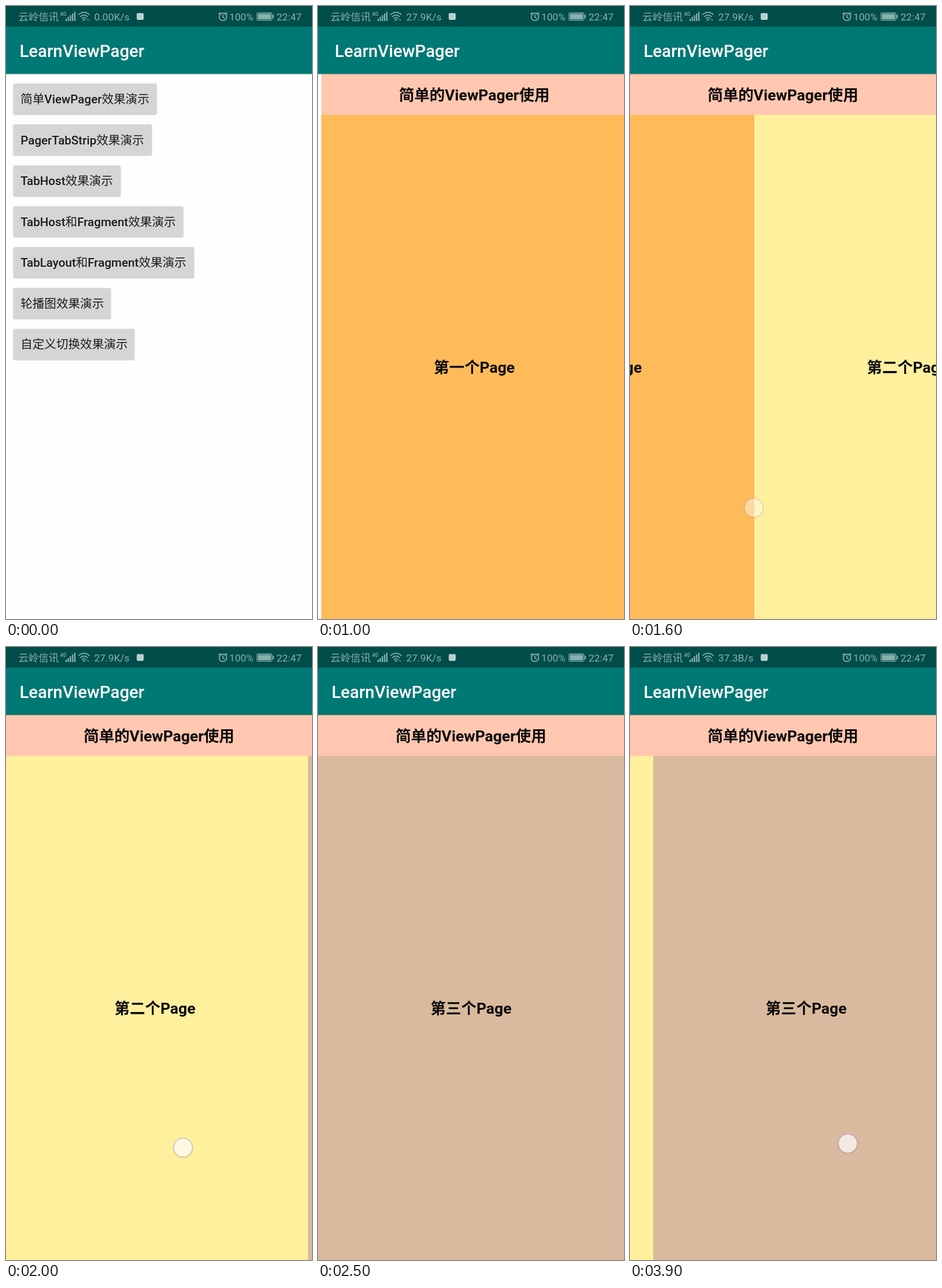
An HTML page for the animation above (4 s loop, 529x1058 px).

```html
<!DOCTYPE html>
<html lang="zh-CN">
<head>
<meta charset="utf-8">
<title>LearnViewPager</title>
<style>
html, body { margin: 0; width: 100%; height: 100%; overflow: hidden; background: #fefefe; }
svg { display: block; width: 100%; height: 100%; }
text { font-family: Roboto, "Noto Sans CJK SC", "Noto Sans CJK", sans-serif; white-space: pre; }
.status text { font-size: 17.4px; fill: #87b1ae; }
.title { font-size: 29.4px; font-weight: 500; fill: #fff; }
.label { font-size: 20.58px; font-weight: 500; fill: #1d1b1d; }
.head { font-size: 26.46px; font-weight: 700; fill: #0b0908; text-anchor: middle; }
.btn { fill: #d7d4d7; filter: drop-shadow(0 1px 1px rgba(0,0,0,.26)); }
</style>
</head>
<body>
<svg viewBox="0 0 529 1058" preserveAspectRatio="none">
  <defs>
    <linearGradient id="shade" x2="0" y2="1">
      <stop offset="0" stop-color="#000" stop-opacity=".12"/>
      <stop offset="1" stop-color="#000" stop-opacity="0"/>
    </linearGradient>
  </defs>
  <rect width="529" height="1058" fill="#fefefe"/>

  <g id="list">
    <rect y="35" width="529" height="82.3" fill="#007874"/>
    <rect y="117.3" width="529" height="2.5" fill="url(#shade)"/>
    <text class="title" x="23.4" y="87.8">LearnViewPager</text>
    <g id="buttons"></g>
  </g>

  <g id="pager">
    <rect y="117" width="529" height="941" fill="#ffc7b0"/>
    <rect y="35" width="529" height="82.3" fill="#007874"/>
    <text class="title" x="23.4" y="87.8">LearnViewPager</text>
    <g id="pages"></g>
    <rect y="117.3" width="529" height="2.5" fill="url(#shade)"/>
    <text class="head" x="264.5" y="163.3">简单的ViewPager使用</text>
  </g>

  <g class="status">
    <rect width="529" height="35.6" fill="#004d49"/>
    <text x="21.5" y="24.7">云岭信讯</text>
    <text x="93.5" y="16.5" style="font-size:8.6px;font-weight:500">4G</text>
    <g id="bars" fill="#87b1ae"></g>
    <g fill="none" stroke="#87b1ae" stroke-width="1.7">
      <path d="M125.3 15.2Q134.8 6.6 144.3 15.2M128.2 18.6Q134.8 12.6 141.4 18.6M131.2 21.8Q134.8 18.8 138 21.4"/>
      <circle cx="375" cy="18.8" r="6.4"/>
      <path d="M375 14.8V19.2L378 20.8M367.4 14L371 10.8M379 10.8L382.6 14"/>
      <rect x="434" y="12" width="25.6" height="12.6" rx="1.5" stroke-width="1.3"/>
    </g>
    <g fill="#87b1ae">
      <circle cx="134.6" cy="24" r="1.6"/>
      <path d="M137.6 23.4l1.6-2 1.6 2zM140.6 23.4l1.6 2 1.6-2z"/>
      <rect x="435.6" y="13.6" width="22.4" height="9.4"/>
      <rect x="461" y="15" width="2" height="6.6" rx=".8"/>
    </g>
    <text id="speed" x="152.5" y="24.7"></text>
    <rect x="226" y="12.3" width="12" height="11.6" rx="1.8" fill="#b9d0ce"/>
    <text x="386" y="24.7">100%</text>
    <text x="467.8" y="24.7">22:47</text>
  </g>

  <g id="touch">
    <circle cy="1.5" r="18" fill="#000" fill-opacity=".04"/>
    <circle r="16.3" fill="#fff" fill-opacity=".72" stroke="#a48ba8" stroke-opacity=".5" stroke-width="1.5"/>
  </g>
</svg>
<script>
const LOOP = 4000, STEP = 100, W = 529;
const $ = id => document.getElementById(id);

function add(parent, tag, attrs, text) {
  const el = document.createElementNS("http://www.w3.org/2000/svg", tag);
  for (const k in attrs) el.setAttribute(k, attrs[k]);
  if (text) el.textContent = text;
  return parent.appendChild(el);
}

const buttons = [
  ["简单ViewPager效果演示", 247.5], ["PagerTabStrip效果演示", 239],
  ["TabHost效果演示", 185], ["TabHost和Fragment效果演示", 293.5],
  ["TabLayout和Fragment效果演示", 312], ["轮播图效果演示", 168],
  ["自定义切换效果演示", 209]
].map(([label, width], i) => {
  const y = 134 + i * 70.57;
  const box = add($("buttons"), "rect", { class: "btn", x: 12.8, y, width, height: 52.5, rx: 2 });
  add($("buttons"), "text", { class: "label", x: 25.2, y: y + 34 }, label);
  return box;
});

[["一", "#ffba5a"], ["二", "#fff09e"], ["三", "#d9ba9f"]].forEach(([n, fill], i) => {
  add($("pages"), "rect", { x: i * W, y: 188, width: W, height: 870, fill });
  add($("pages"), "text", { class: "head", x: (i + .5) * W, y: 633.3 }, `第${n}个Page`);
});

for (let i = 0; i < 5; i++) {
  const height = 4 + i * 3;
  add($("bars"), "rect", { x: 102.8 + i * 3.75, y: 26 - height, width: 2.3, height });
}

// [step, value] pairs, linear in between
const slide = [[8, W], [9, 110], [10, 5.7], [11, 0]];
const scroll = [
  [13, 0], [14, 27], [15, 155], [16, 314], [17, 470], [18, 521], [19, W],
  [20, 536], [21, 642], [22, 825], [23, 990], [24, 1048], [25, 2 * W],
  [38, 2 * W], [39, 1018]
];
// step: [x, y, opacity]
const touches = {
  7: [43, 174, .9], 8: [43, 174, .45],
  13: [440, 868, 1], 14: [390, 868, 1], 15: [262, 867, 1], 16: [214, 866, .6],
  19: [336, 865, 1], 20: [306, 864, 1], 21: [200, 863, 1], 22: [130, 862, .5],
  37: [313, 858, .8], 38: [332, 858, 1], 39: [376.5, 857, 1]
};

function at(keys, s) {
  if (s <= keys[0][0]) return keys[0][1];
  for (let i = 1; i < keys.length; i++) {
    const [a, v] = keys[i - 1], [b, w] = keys[i];
    if (s <= b) return v + (w - v) * (s - a) / (b - a);
  }
  return keys[keys.length - 1][1];
}

const move = (id, x, y = 0) => $(id).setAttribute("transform", `translate(${x} ${y})`);

function draw(s) {
  move("pager", at(slide, s));
  $("pager").style.display = s > 8 ? "" : "none";
  move("pages", -at(scroll, s));
  buttons[0].style.fill = s === 7 ? "#cac7ca" : s === 8 || s === 9 ? "#bfbbbe" : "";
  $("speed").textContent = s < 5 ? "0.00K/s" : s < 35 ? "27.9K/s" : "37.3B/s";
  const dot = touches[s];
  $("touch").style.opacity = dot ? dot[2] : 0;
  if (dot) move("touch", dot[0], dot[1]);
}

const start = performance.now();
function tick(now) {
  draw(Math.floor(Math.max(0, now - start) % LOOP / STEP));
  requestAnimationFrame(tick);
}
draw(0);
requestAnimationFrame(tick);
</script>
</body>
</html>
```
